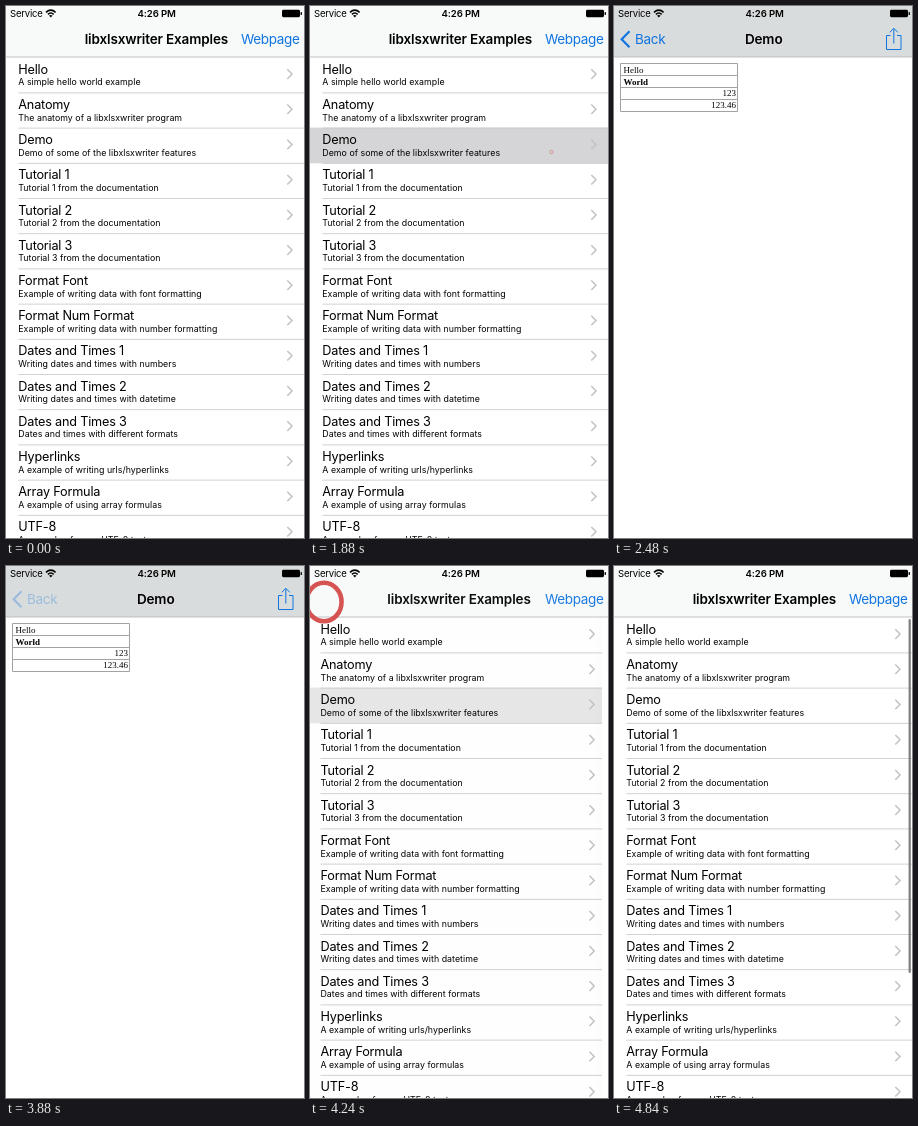
Animation of 298 by 532 pixels, one loop 5380 ms. Source, as an HTML page:

```html
<!DOCTYPE html>
<html lang="en">
<head>
<meta charset="utf-8">
<title>Examples list</title>
<style>
html, body { margin: 0; width: 100%; height: 100%; overflow: hidden; background: #fff; }
svg { display: block; width: 100%; height: 100%; font-family: Inter, Roboto, sans-serif; }
.title { font-size: 12.7px; letter-spacing: -.016em; }
.sub { font-size: 8.8px; letter-spacing: .004em; }
.bar { font-size: 13.5px; letter-spacing: -.024em; }
.bold { font-weight: 600; letter-spacing: -.01em; }
.blue { fill: #0f74e0; }
.line { fill: none; stroke: #0f74e0; }
.cell { font: 9px "Liberation Serif", serif; }
</style>
</head>
<body>
<svg viewBox="0 0 298 532">
  <defs>
    <linearGradient id="shade">
      <stop offset="0" stop-opacity="0"/>
      <stop offset="1" stop-opacity=".12"/>
    </linearGradient>
  </defs>
  <rect width="298" height="532" fill="#fff"/>
  <g id="list">
    <rect id="selected" y="121.6" width="298" height="35.7" fill="#d5d5d7"/>
    <g id="rows"></g>
  </g>
  <rect id="dim" width="298" height="532"/>
  <g id="page">
    <rect id="edge" x="-9" width="9" height="532" fill="url(#shade)"/>
    <rect width="298" height="532" fill="#fff"/>
    <g id="spinner"></g>
    <g id="sheet">
      <path d="M6.5 57.5H123.5V105.5H6.5ZM6.5 69.5H123.5M6.5 81.5H123.5M6.5 93.5H123.5" fill="none" stroke="#a2a2a2"/>
      <g class="cell">
        <text x="9.5" y="66.5">Hello</text>
        <text x="9.5" y="78.5" font-weight="bold">World</text>
        <text x="122" y="90.3" text-anchor="end">123</text>
        <text x="122" y="102.3" text-anchor="end">123.46</text>
      </g>
    </g>
  </g>
  <rect id="nav" width="298" height="51"/>
  <rect y="50.6" width="298" height=".8" fill="#b2b2b4"/>
  <g class="bar">
    <text id="listTitle" class="bold" x="150.4" y="38" text-anchor="middle">libxlsxwriter Examples</text>
    <text id="web" class="blue" x="293.5" y="38" text-anchor="end">Webpage</text>
    <text id="pageTitle" class="bold" x="149.7" y="38" text-anchor="middle">Demo</text>
    <text id="back" class="blue" x="21" y="38">Back</text>
  </g>
  <path id="chevron" class="line" stroke-width="2.2" d="M15.5 25.3L7.7 33.3L15.5 41.3"/>
  <path id="share" class="line" d="M276.5 29.5H272.5V43.5H287V29.5H283M279.8 37.5V22.5M275.8 26.3L279.8 22.3L283.8 26.3"/>
  <g id="status">
    <text x="4" y="11.3" font-size="9.5" letter-spacing="-.2">Service</text>
    <path d="M40 6.4Q44.8 1.9 49.6 6.4M41.9 8.4Q44.8 5.7 47.7 8.4" fill="none" stroke="#000" stroke-width="1.5"/>
    <path d="M43 9.6Q44.8 8.2 46.6 9.6L44.8 11.6Z"/>
    <text class="bold" x="150.7" y="11.3" font-size="9.6" text-anchor="middle">4:26 PM</text>
    <rect x="276" y="3.8" width="18" height="7.4" rx="1.4"/>
    <rect x="294.6" y="6" width="1.3" height="3" rx=".6"/>
  </g>
  <rect id="scroll" x="294.6" y="53" width="2.2" height="354" rx="1.1" fill="#7d7d7f"/>
  <ellipse id="ring" fill="none" stroke="#d2423f"/>
</svg>
<script>
const LOOP = 5380, STEP = 60, ROW = 35.2, TOP = 51.7;
const PUSH = { touch: 1760, slide: 1932, ring: 1859, x: 241.5, y: 146 };
const POP = { touch: 3880, slide: 4069, ring: 4012, x: 14, y: 36 };
const items = [
  ["Hello", "A simple hello world example"],
  ["Anatomy", "The anatomy of a libxlsxwriter program"],
  ["Demo", "Demo of some of the libxlsxwriter features"],
  ["Tutorial 1", "Tutorial 1 from the documentation"],
  ["Tutorial 2", "Tutorial 2 from the documentation"],
  ["Tutorial 3", "Tutorial 3 from the documentation"],
  ["Format Font", "Example of writing data with font formatting"],
  ["Format Num Format", "Example of writing data with number formatting"],
  ["Dates and Times 1", "Writing dates and times with numbers"],
  ["Dates and Times 2", "Writing dates and times with datetime"],
  ["Dates and Times 3", "Dates and times with different formats"],
  ["Hyperlinks", "A example of writing urls/hyperlinks"],
  ["Array Formula", "A example of using array formulas"],
  ["UTF-8", "A example of some UTF-8 text"]
];

const el = id => document.getElementById(id);
const set = (id, attrs) => {
  for (const k in attrs) el(id).setAttribute(k, attrs[k]);
};
const shift = (id, x, opacity = 1) => set(id, { transform: `translate(${x.toFixed(2)} 0)`, opacity });
const clamp = v => Math.min(1, Math.max(0, v));
const spring = ms => {
  const u = Math.max(0, ms) * 0.034;
  return 1 - Math.exp(-u) * (1 + u);
};

el("rows").innerHTML = items.map(([title, sub], i) => {
  const y = TOP + i * ROW, mid = y + 16.4;
  return `<text class="title" x="12.3" y="${y + 16}">${title}</text>
    <text class="sub" x="12.3" y="${y + 27.7}">${sub}</text>
    <path d="M281.3 ${mid - 4.8}L286 ${mid}L281.3 ${mid + 4.8}" fill="none" stroke="#c2c2c7" stroke-width="1.5"/>
    <rect x="12.3" y="${y + ROW - .4}" width="286" height=".8" fill="#c8c7cc"/>`;
}).join("");

el("spinner").innerHTML = Array.from({ length: 12 }, (_, i) =>
  `<path d="M149 258.5V252.8" stroke="#555" stroke-width="2.3" stroke-linecap="round" transform="rotate(${i * 30} 149 265.3)"/>`
).join("");
const spokes = [...el("spinner").children];

function hold(t) {
  if (t < 500) return 0;
  const start = t < 2980 ? 500 : 2980;
  const q = start + Math.floor((t - start) / STEP) * STEP;
  return start === 500 ? Math.min(q, 2480) : Math.min(q, 4840);
}

function drawRing(t) {
  const tap = t < 3000 ? PUSH : POP, age = t - tap.ring;
  const r = Math.max(0, age * 0.077);
  set("ring", {
    cx: tap.x, cy: tap.y, rx: r, ry: r * 1.1,
    "stroke-width": r * 0.26,
    opacity: age > 0 ? clamp((490 - age) / 290) : 0
  });
}

function draw(time) {
  const t = hold(time);
  const p = spring(t - PUSH.slide) - spring(t - POP.slide), q = 1 - p;
  const pressed = t >= POP.touch && t < POP.slide;

  shift("list", -89 * p);
  set("selected", { opacity: t < PUSH.touch ? 0 : clamp((4400 - t) / 280) });
  set("dim", { opacity: 0.1 * p });
  shift("page", 298 * q);
  set("edge", { opacity: clamp(p * 4) });

  const loaded = t >= 2360;
  set("sheet", { opacity: loaded ? 1 : 0 });
  set("spinner", { opacity: loaded ? 0 : 1 });
  const head = 11 + Math.floor((t - 2060) / STEP);
  spokes.forEach((s, i) => {
    const lag = (((head - i) % 12) + 12) % 12;
    s.setAttribute("opacity", Math.max(0.22, 0.8 - lag * 0.1));
  });

  const tone = (a, b) => Math.round(a + (b - a) * Math.pow(p, 1.5));
  set("nav", { fill: `rgb(${tone(248, 217)},${tone(249, 220)},${tone(249, 220)})` });
  const fadeOut = Math.pow(q, 2.8), fadeIn = Math.pow(p, 1.2);
  shift("listTitle", -68 * p, fadeOut);
  shift("web", 0, fadeOut);
  shift("pageTitle", 149 * q, Math.pow(p, 1.6));
  shift("back", 88 * q, pressed ? 0.3 : fadeIn);
  set("chevron", { opacity: pressed ? 0.3 : Math.pow(p, 4) });
  set("share", { opacity: fadeIn });
  set("scroll", { opacity: clamp((t - 4400) / 200) });
  drawRing(t);
}

const begin = performance.now();
function tick() {
  draw((performance.now() - begin) % LOOP);
  requestAnimationFrame(tick);
}
tick();
</script>
</body>
</html>
```
